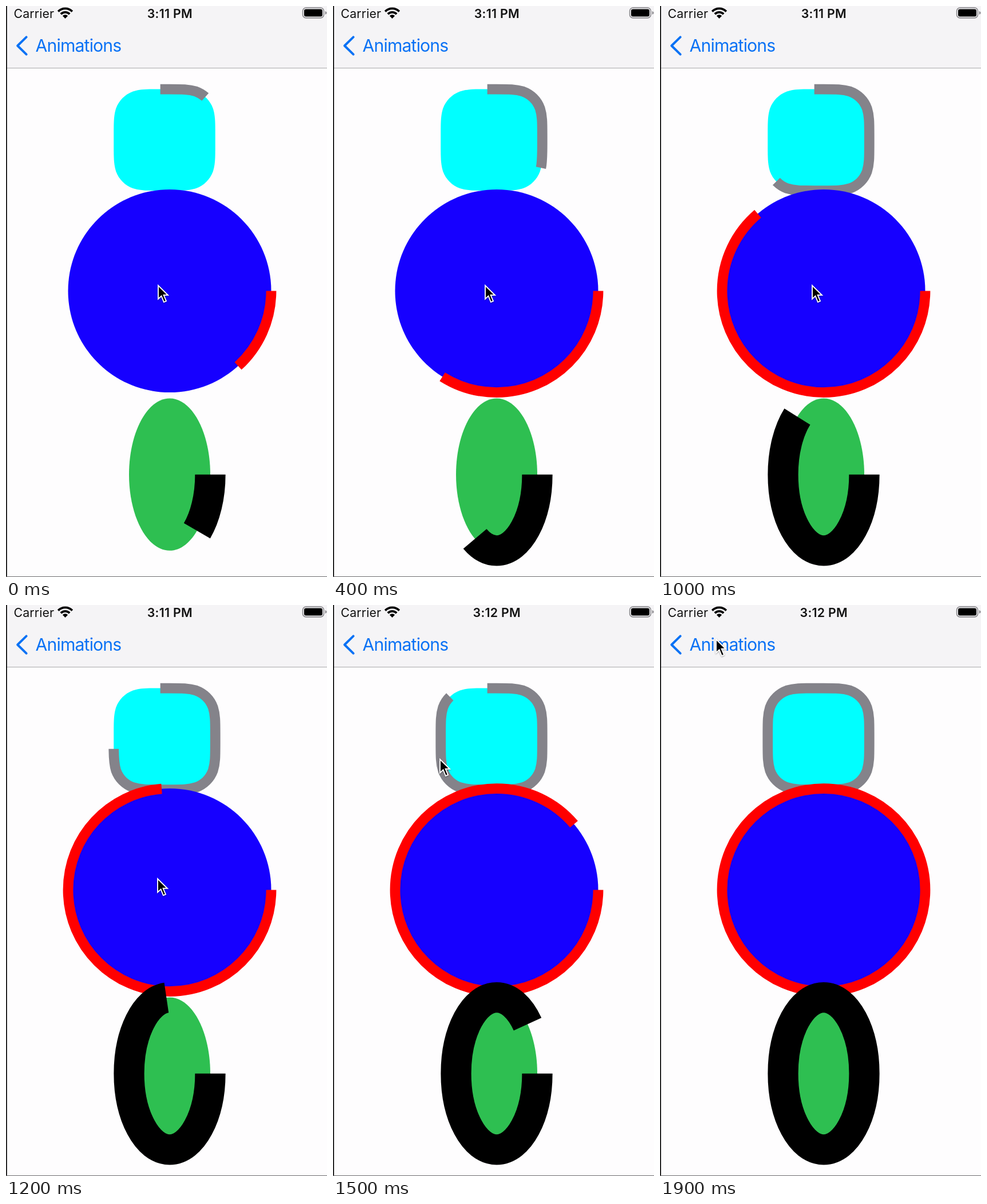
Recreate the animation shown at these times as an HTML page. Size 561 by 999 pixels, loop 2000 ms.

```html
<!DOCTYPE html>
<html lang="en">
<head>
<meta charset="utf-8">
<title>Animations</title>
<style>
  html, body { margin: 0; width: 100%; height: 100%; overflow: hidden; background: #fefdfe; }
  svg { display: block; width: 100%; height: 100%; }
  text { font-family: Inter, Roboto, sans-serif; }
  #cursor { filter: drop-shadow(0 1px 1.2px rgba(0, 0, 0, .35)); }
</style>
</head>
<body>
<svg viewBox="0 0 561 999">
  <rect width="561" height="999" fill="#fefdfe"/>
  <rect width="561" height="108" fill="#f5f4f6"/>
  <rect y="108" width="561" height="1.2" fill="#b3b2b5"/>

  <g id="shapes"></g>

  <text x="13.5" y="20.8" font-size="21.3" letter-spacing=".15" fill="#111">Carrier</text>
  <g fill="none" stroke="#000" stroke-width="3.8">
    <path d="M91.2 9.6A17.3 17.3 0 0 1 115.8 9.6"/>
    <path d="M95.8 14.2A10.8 10.8 0 0 1 111.2 14.2"/>
    <path d="M103.5 22L98.9 17.2A6.5 6.5 0 0 1 108.1 17.2Z" fill="#000" stroke="none"/>
  </g>
  <text id="clock" x="286.3" y="20.8" font-size="21.3" font-weight="600" letter-spacing=".3" text-anchor="middle" fill="#111"></text>
  <rect x="518.6" y="3.2" width="36.8" height="17.6" rx="5.5" fill="none" stroke="#8c8b8f" stroke-width="1.7"/>
  <rect x="521" y="5.6" width="32" height="12.8" rx="3.2"/>
  <path d="M557.8 9Q560.6 10 560.6 12T557.8 15Z" fill="#8c8b8f"/>

  <path d="M35.6 54.4L20.2 69.5L35.6 84.6" fill="none" stroke="#0a72f5" stroke-width="4" stroke-linecap="round" stroke-linejoin="round"/>
  <text x="51.5" y="80" font-size="30.2" letter-spacing="-.85" fill="#0a72f5">Animations</text>

  <rect width="1.8" height="999" fill="#141414"/>
  <rect y="998" width="561" height="1" fill="#6a696b"/>
  <path id="cursor" d="M1 2V25.5L6.6 20.3L10.9 31L15 29.2L10.6 18.8H18Z" fill="#000" stroke="#fff" stroke-width="1.9"/>
</svg>
<script>
const LOOP = 2000, STEP = 100;
const SCALE = 1.775;
const $ = id => document.getElementById(id);

const mix = (a, b, t) => a.map((v, i) => v + (b[i] - v) * t);

// Left part of a cubic cut at t; its last point lies on the curve.
function cut([a, b, c, d], t) {
  const ab = mix(a, b, t), bc = mix(b, c, t), cd = mix(c, d, t);
  const abc = mix(ab, bc, t), bcd = mix(bc, cd, t);
  return [a, ab, abc, mix(abc, bcd, t)];
}

function lengthOf(seg) {
  let sum = 0, last = seg[0];
  for (let i = 1; i <= 40; i++) {
    const p = cut(seg, i / 40)[3];
    sum += Math.hypot(p[0] - last[0], p[1] - last[1]);
    last = p;
  }
  return sum;
}

function ellipse(cx, cy, rx, ry) {
  const k = 0.5523, cos = [1, 0, -1, 0, 1], sin = [0, 1, 0, -1, 0];
  return [0, 1, 2, 3].map(i => {
    const [c, s, e, f] = [cos[i], sin[i], cos[i + 1], sin[i + 1]];
    return [[c, s], [c - k * s, s + k * c], [e + k * f, f - k * e], [e, f]]
      .map(([x, y]) => [cx + rx * x, cy + ry * y]);
  });
}

// Square with continuous corners, clockwise from the top edge.
function squircle(cx, cy, half, r) {
  const near = [[1.52866, 0], [1.08849, 0], [0.86841, 0], [0.63149, 0.07491], [0.37282, 0.16906]];
  const far = near.map(([a, b]) => [b, a]).reverse();
  const corner = [...near, ...far].map(([a, b]) => [half - a * r, b * r - half]);
  const start = [-corner[0][0], -half];
  const side = [start, mix(start, corner[0], 1 / 3), mix(start, corner[0], 2 / 3), corner[0]];
  const quarter = [side, corner.slice(0, 4), corner.slice(3, 7), corner.slice(6, 10)];
  const segs = [];
  for (let n = 0; n < 4; n++) {
    for (const seg of quarter) {
      segs.push(seg.map(p => {
        let [x, y] = p;
        for (let i = 0; i < n; i++) [x, y] = [-y, x];
        return [cx + x, cy + y];
      }));
    }
  }
  return segs;
}

const fmt = p => p.map(v => v.toFixed(2)).join(" ");

// Path data for the first fraction f of the outline.
function trim({ segs, lens, total }, f) {
  let left = f * total, d = "M" + fmt(segs[0][0]);
  for (let i = 0; i < segs.length && left > 0; i++) {
    const part = left < lens[i] ? cut(segs[i], left / lens[i]) : segs[i];
    d += "C" + part.slice(1).map(fmt).join(" ");
    left -= lens[i];
  }
  return f >= 1 ? d + "Z" : d;
}

function addPath(attrs) {
  const el = document.createElementNS("http://www.w3.org/2000/svg", "path");
  for (const name in attrs) el.setAttribute(name, attrs[name]);
  return $("shapes").appendChild(el);
}

function shape(segs, fill, stroke, width) {
  const lens = segs.map(lengthOf);
  const outline = { segs, lens, total: lens.reduce((a, b) => a + b) };
  addPath({ d: trim(outline, 1), fill });
  const ring = addPath({ fill: "none", stroke, "stroke-width": width * SCALE });
  return f => ring.setAttribute("d", trim(outline, f));
}

const rings = [
  shape(squircle(277, 234.3, 50 * SCALE, 30 * SCALE), "#00ffff", "#84838a", 10),
  shape(ellipse(286, 498.6, 100 * SCALE, 100 * SCALE), "#1600ff", "#ff0000", 10),
  shape(ellipse(286, 819.7, 40 * SCALE, 75 * SCALE), "#2ebf51", "#000", 30)
];

// Keys are [time, ...values], joined linearly.
function track(keys, t) {
  const i = keys.findIndex(k => k[0] > t);
  if (i < 0) return keys[keys.length - 1].slice(1);
  const a = keys[i - 1], b = keys[i];
  return mix(a, b, (t - a[0]) / (b[0] - a[0])).slice(1);
}

const progress = [[0, 0.1325], [400, 0.339], [700, 0.488], [1724, 1]];
const pointer = [
  [0, 265, 487], [1100, 265, 487], [1200, 264, 477], [1300, 248, 425],
  [1500, 186, 268], [1700, 112, 88], [1800, 97, 56], [1900, 97, 58]
];

function draw(t) {
  const [f] = track(progress, t);
  rings.forEach(ring => ring(f));
  const [x, y] = track(pointer, t);
  $("cursor").setAttribute("transform", `translate(${x} ${y})`);
  $("clock").textContent = t < 1400 ? "3:11 PM" : "3:12 PM";
}

function tick() {
  const t = performance.now() % LOOP;
  draw(Math.floor(t / STEP) * STEP);
  requestAnimationFrame(tick);
}
tick();
</script>
</body>
</html>
```
